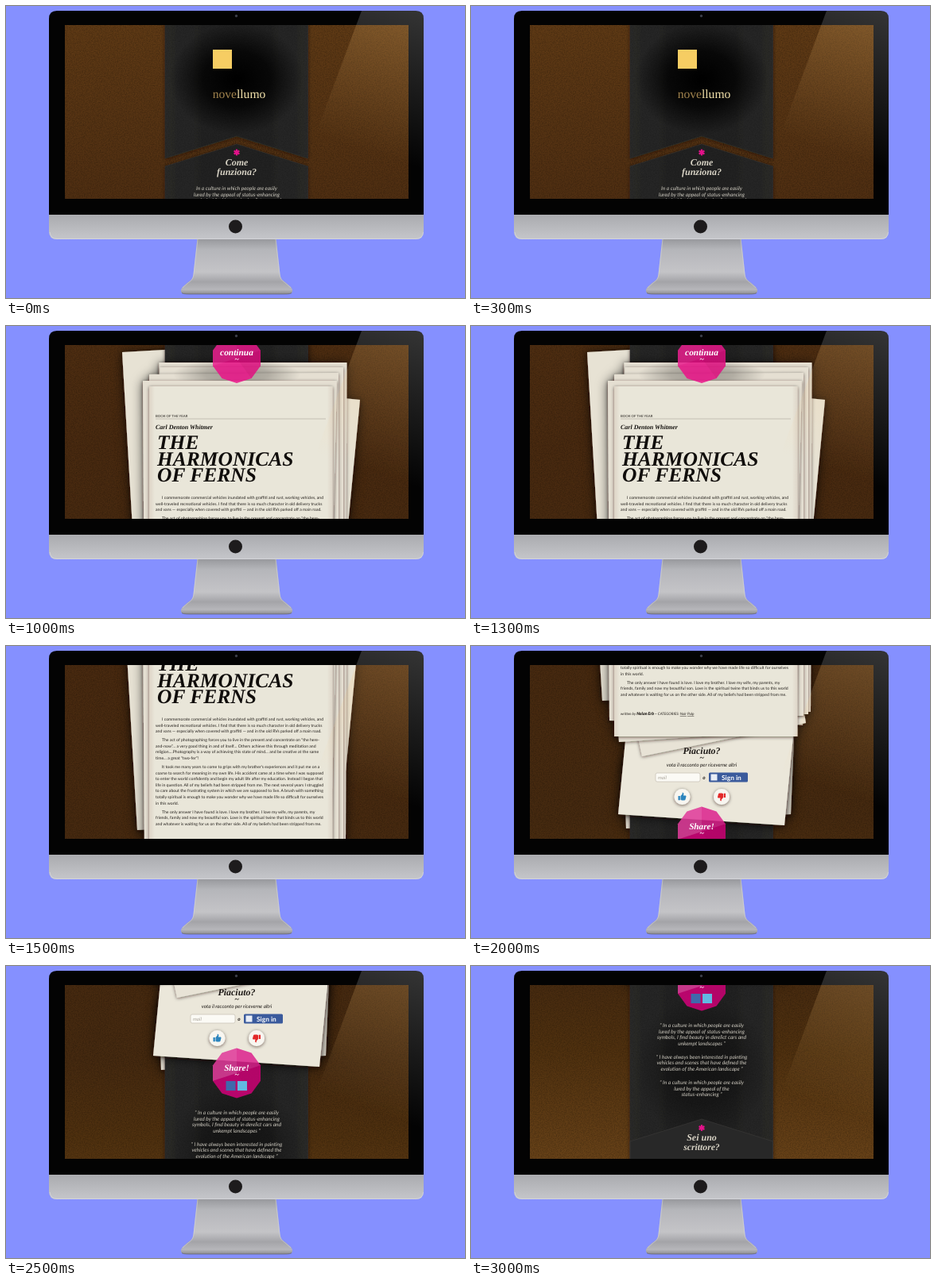
An HTML page for the animation above (3.5 s loop, 577 by 368 pixels).

```html
<!DOCTYPE html>
<html lang="en">
<head>
<meta charset="utf-8">
<title>Story site on a desktop screen</title>
<style>
html, body { margin: 0; width: 100%; height: 100%; overflow: hidden; background: #8590ff; }
svg { display: block; width: 577px; height: 368px; }
text { text-rendering: geometricPrecision; white-space: pre; }
.sans { font-family: Lato, sans-serif; }
.ital { font-family: Lato, sans-serif; font-style: italic; }
.head { font-family: "Liberation Serif", serif; font-style: italic; font-weight: bold; }
.word { font-family: "Liberation Serif", serif; }
</style>
</head>
<body>
<svg viewBox="0 0 577 368" xmlns="http://www.w3.org/2000/svg">
  <defs>
    <clipPath id="screen"><rect x="74" y="24" width="432" height="219"/></clipPath>
    <linearGradient id="leather" gradientUnits="userSpaceOnUse" x1="0" y1="24" x2="0" y2="1000">
      <stop offset="0" stop-color="#5f3a15"/><stop offset=".22" stop-color="#502f12"/>
      <stop offset=".4" stop-color="#492a10"/><stop offset=".76" stop-color="#462a10"/>
      <stop offset=".86" stop-color="#50310f"/><stop offset="1" stop-color="#684218"/>
    </linearGradient>
    <linearGradient id="card" x1="0" x2="1" y1="0" y2="0">
      <stop offset="0" stop-color="#2a2a29"/><stop offset=".3" stop-color="#232323"/>
      <stop offset=".7" stop-color="#232323"/><stop offset="1" stop-color="#2a2a29"/>
    </linearGradient>
    <radialGradient id="dark">
      <stop offset="0" stop-color="#000"/><stop offset=".5" stop-color="#000" stop-opacity=".75"/>
      <stop offset="1" stop-color="#000" stop-opacity="0"/>
    </radialGradient>
    <linearGradient id="sheet" x1="0" x2="1" y1="0" y2="0">
      <stop offset="0" stop-color="#ddd3c5"/><stop offset=".03" stop-color="#e9e6d9"/>
      <stop offset=".97" stop-color="#e9e6d9"/><stop offset="1" stop-color="#ded5c8"/>
    </linearGradient>
    <linearGradient id="chin" x1="0" x2="0" y1="0" y2="1">
      <stop offset="0" stop-color="#a9aaae"/><stop offset=".5" stop-color="#b7b8bc"/>
      <stop offset="1" stop-color="#c5c6ca"/>
    </linearGradient>
    <linearGradient id="neck" gradientUnits="userSpaceOnUse" x1="0" y1="293" x2="0" y2="363">
      <stop offset="0" stop-color="#96979b"/><stop offset=".2" stop-color="#b5b6ba"/>
      <stop offset=".6" stop-color="#c4c4c7"/><stop offset=".78" stop-color="#a4a4a8"/>
      <stop offset=".92" stop-color="#b6b6ba"/><stop offset="1" stop-color="#8d8d91"/>
    </linearGradient>
    <linearGradient id="glare" gradientUnits="userSpaceOnUse" x1="505" y1="6" x2="446" y2="180">
      <stop offset="0" stop-color="#fff" stop-opacity=".19"/><stop offset="1" stop-color="#fff" stop-opacity="0"/>
    </linearGradient>
    <linearGradient id="warm" gradientUnits="userSpaceOnUse" x1="505" y1="6" x2="446" y2="180">
      <stop offset="0" stop-color="#ffc878" stop-opacity=".24"/><stop offset="1" stop-color="#ffc878" stop-opacity="0"/>
    </linearGradient>
    <filter id="grain" x="0" y="0" width="1" height="1">
      <feTurbulence type="fractalNoise" baseFrequency=".7" numOctaves="2" seed="4"/>
      <feColorMatrix values="0 0 0 0 0  0 0 0 0 0  0 0 0 0 0  1.6 0 0 0 -.55"/>
    </filter>
    <filter id="lift" x="-.2" y="-.2" width="1.4" height="1.4">
      <feDropShadow dx="0" dy="1" stdDeviation="2.2" flood-color="#1a0c00" flood-opacity=".6"/>
    </filter>
    <filter id="deep" x="-.2" y="-.2" width="1.4" height="1.4">
      <feDropShadow dx="0" dy="1" stdDeviation="7" flood-color="#000" flood-opacity=".65"/>
    </filter>
  </defs>

  <rect width="577" height="368" fill="#8590ff"/>
  <path d="M240.500 292H339.500L344.500 338Q345 345 351 348L358 354Q361 358 359.500 361Q358 363 350 363H230Q222 363 220.500 361Q219 358 222 354L229 348Q235 345 235.500 338Z" fill="url(#neck)"/>
  <path d="M241 294L236 338Q235.500 345 229.500 348.500L222 355M339 294L344 338Q344.500 345 350.500 348.500L358 355" fill="none" stroke="#dcdcdf" stroke-width=".8" opacity=".6"/>
  <path d="M221 361.500Q222 363 230 363H350Q358 363 359 361.500" fill="none" stroke="#66666c" stroke-width=".8"/>
  <path d="M54 262H525V284Q525 294 515 294H64Q54 294 54 284Z" fill="url(#chin)"/>
  <path d="M55 285Q56 293.500 64 293.500H515Q524 293.500 524.500 285" fill="none" stroke="#e0e0e4" stroke-width=".6"/>
  <path d="M54 263V16Q54 6 64 6H515Q525 6 525 16V263Z" fill="#030303"/>
  <path d="M447 6H515Q525 6 525 16V243H359Z" fill="url(#glare)"/>
  <circle cx="289.500" cy="12.500" r="1.700" fill="#3a3d47"/>
  <circle cx="288.500" cy="278" r="8.500" fill="#1d1b1c"/>
  <g clip-path="url(#screen)">
    <g id="page"></g>
    <path d="M447 6H525V243H359Z" fill="url(#warm)"/>
  </g>
</svg>
<script>
const HOLD = 500;
const STOPS = [0, 140, 261, 385, 548, 647, 757];
const MID = 290;
const page = document.getElementById('page');

const tag = (name, attrs, body = '') =>
  `<${name} ${Object.entries(attrs).map(([k, v]) => `${k}="${v}"`).join(' ')}>${body}</${name}>`;
const rect = (x, y, width, height, fill, more) => tag('rect', { x, y, width, height, fill, ...more });
const poly = (points, fill, more) => tag('polygon', { points, fill, ...more });
const path = (d, more) => tag('path', { d, ...more });
const text = (cls, x, y, size, fill, str, more) =>
  tag('text', { class: cls, x, y, 'font-size': size, fill, ...more }, str);
const mid = (cls, y, size, fill, str, x = MID) => text(cls, x, y, size, fill, str, { 'text-anchor': 'middle' });
const lines = (y, strs) => strs.map((s, i) => mid('ital', y + i * 7.55, 6.6, '#d2cec3', s)).join('');
const sheet = (points, fill = '#e5dfd2') => poly(points, fill, { filter: 'url(#lift)' });
const shade = (cy, rx, ry, opacity) => tag('ellipse', { cx: MID, cy, rx, ry, opacity, fill: 'url(#dark)' });
const grain = (x, width, opacity) => rect(x, 24, width, 976, '#000', { filter: 'url(#grain)', opacity });

function star(y) {
  const arms = [0, 60, 120].map(a => tag('line', {
    x1: MID, x2: MID, y1: y - 3.9, y2: y + 3.9, transform: `rotate(${a} ${MID} ${y})`
  })).join('');
  return tag('g', { stroke: '#e4128b', 'stroke-width': 2.2 }, arms);
}

// Ten-sided translucent badge with a few facets
function badge(cy, fill, shine) {
  const v = Array.from({ length: 10 }, (_, i) => {
    const a = i * Math.PI / 5;
    return `${(MID + 31.5 * Math.sin(a)).toFixed(1)},${(cy - 31.5 * Math.cos(a)).toFixed(1)}`;
  });
  const c = `${MID},${cy}`;
  const pick = (...ids) => ids.map(i => v[i]).join(' ');
  return poly(v.join(' '), fill, { 'fill-opacity': .83 }) +
    poly(pick(7, 8, 9, 0) + ' ' + c, '#fff', { opacity: shine }) +
    poly(pick(0, 1, 2) + ' ' + c, '#fff', { opacity: shine * .55 }) +
    poly(pick(2, 3, 4) + ' ' + c, '#70003c', { opacity: .08 });
}

function leather() {
  return rect(74, 24, 432, 976, 'url(#leather)') + grain(74, 432, .28);
}

// Sheets tucked behind the dark cards
function tucked() {
  return tag('g', { filter: 'url(#deep)' },
    sheet('146,294 376,281 394,604 165,617', '#e7e2d4') +
    sheet('192,690 300,690 300,772 195,778') +
    sheet('300,640 407,640 402,760 300,764'));
}

function cards() {
  const edge = { stroke: '#353433', 'stroke-width': .6, filter: 'url(#lift)' };
  return poly('200,0 379.500,0 379.500,192 290,164 200,192', 'url(#card)', edge) +
    shade(92, 84, 70, 1) +
    poly('200,202 290,174 379.500,202 379.500,1010 200,1010', 'url(#card)', edge) +
    shade(885, 86, 90, .4) +
    grain(200, 179.5, .2) +
    poly('200,978 290,950 379.500,978 379.500,1010 200,1010', '#282828', { stroke: '#3a3937', 'stroke-width': .7 });
}

function intro() {
  const ink = '#d9d4c6';
  const mark = '<tspan fill="#a1834d">nove</tspan><tspan fill="#f3e2ab">llumo</tspan>';
  return rect(260, 55, 24, 24, '#f6cd63') +
    mid('word', 116, 15.6, '#f3e2ab', mark, 293) +
    star(184.5) + mid('head', 201, 12, ink, 'Come') + mid('head', 213, 12, ink, 'funziona?') +
    lines(232.2, [
      'In a culture in which people are easily',
      'lured by the appeal of status-enhancing',
      'symbols, I find beauty in derelict cars and',
      'unkempt landscapes. I have always been',
      'interested in painting...'
    ]);
}

function papers() {
  return tag('g', { filter: 'url(#deep)' },
    sheet('215,332 445,354 417,648 187,626', '#e7e2d4') +
    sheet('200,606 409,620 394,774 185,760', '#ebe7da') +
    sheet('190,570 402,530 421,645 215,687', '#e8e3d6') +
    sheet('178,560 380,560 380,656 186,669') +
    sheet('192.500,307 428.500,307 427,631 190,631') +
    sheet('193.500,313 424,313 424,634 188,634') +
    sheet('180,322 418,320 418,636 180,636') +
    shade(322, 80, 20, .3) +
    sheet('172,330 416,330 408,645 174,642') +
    rect(180, 337, 230.5, 325, 'url(#sheet)', { filter: 'url(#lift)' }));
}

const STORY = [
  ['I commemorate commercial vehicles inundated with graffiti and rust, working vehicles, and',
   'well-traveled recreational vehicles. I find that there is so much character in old delivery trucks',
   'and vans — especially when covered with graffiti — and in the old RVs parked off a main road.'],
  ['The act of photographing forces you to live in the present and concentrate on “the here-',
   'and-now”… a very good thing in and of itself… Others achieve this through meditation and',
   'religion….Photography is a way of achieving this state of mind… and be creative at the same',
   'time… a great “two-fer”!'],
  ['It took me many years to come to grips with my brother’s experiences and it put me on a',
   'coarse to search for meaning in my own life. His accident came at a time when I was supposed',
   'to enter the world confidently and begin my adult life after my education. Instead I began that',
   'life in question. All of my beliefs had been stripped from me. The next several years I struggled',
   'to care about the frustrating system in which we are supposed to live. A brush with something',
   'totally spiritual is enough to make you wonder why we have made life so difficult for ourselves',
   'in this world.'],
  ['The only answer I have found is love. I love my brother. I love my wife, my parents, my',
   'friends, family and now my beautiful son. Love is the spiritual twine that binds us to this world',
   'and whatever is waiting for us on the other side. All of my beliefs had been stripped from me.']
];

function story() {
  const ink = '#25211d';
  let out = text('sans', 188, 376, 4.3, ink, 'BOOK OF THE YEAR') +
    rect(188, 377.7, 214, .6, '#aaa498') +
    text('head', 188, 391, 8, '#14110e', 'Carl Denton Whitmer');
  ['THE', 'HARMONICAS', 'OF FERNS'].forEach((s, i) => {
    out += text('head', 190, 416 + i * 20.7, 25.5, '#100d0b', s);
  });
  let y = 479;
  for (const para of STORY) {
    para.forEach((s, i) => {
      out += text('sans', i ? 188 : 196, y, 5.15, ink, s);
      y += 7.55;
    });
    y += 3.7;
  }
  return out + text('ital', 188, 635, 4.6, ink,
    'written by <tspan font-weight="900" font-size="5.2">Nolan Erb</tspan> ~ CATEGORIES: ' +
    '<tspan text-decoration="underline">Noir</tspan> <tspan text-decoration="underline">Pulp</tspan>');
}

function thumb(x, fill, turn) {
  const hand = path('M-5-1H-2.700V4.300H-5ZM-2-1L.2-3.600V-5.200Q1.900-5.700 1.900-3.400L1.500-1.500H4.200Q5.400-1.200 4.900 0L4 3.500Q3.700 4.500 2.500 4.500H-.5L-2 3.800Z', { fill });
  return tag('circle', { cx: x, cy: 738, r: 10, fill: '#f8f6f0', filter: 'url(#lift)' }) +
    tag('g', { transform: `translate(${x} 738) ${turn}` }, hand);
}

function vote() {
  const ink = '#1c1815';
  return mid('head', 684, 11.9, ink, 'Piaciuto?') + mid('head', 692, 10, ink, '~') +
    mid('ital', 700, 6.4, ink, 'vota il racconto per riceverne altri') +
    rect(232, 708, 56, 11, '#fbfaf5', { rx: 2, stroke: '#cbc5b8', 'stroke-width': .8 }) +
    text('ital', 235, 716, 6.2, '#aaa59b', 'mail') +
    mid('ital', 716, 6.4, ink, '<tspan font-weight="bold">o</tspan>', 293) +
    rect(299, 707.5, 49, 12, '#3a5a9c', { rx: 1.5 }) +
    rect(301.5, 709.5, 8, 8, '#e9eef7') +
    text('sans', 315, 716.5, 8.4, '#fff', 'Sign in', { 'font-weight': 'bold' }) +
    thumb(265.5, '#2b84bd', '') + thumb(315, '#e32929', 'rotate(180)');
}

function share() {
  return badge(782, '#d8007c', .2) +
    mid('head', 779, 11.2, '#fff', 'Share!') + mid('head', 787, 10, '#fff', '~') +
    rect(276.5, 792, 12, 12, '#3f69ab') + rect(291, 792, 12, 12, '#62b9e2');
}

function quotes() {
  const ink = '#d9d4c6';
  return lines(834.2, [
    '“ In a culture in which people are easily',
    'lured by the appeal of status-enhancing',
    'symbols, I find beauty in derelict cars and',
    'unkempt landscapes ”'
  ]) + lines(873.9, [
    '“ I have always been interested in painting',
    'vehicles and scenes that have defined the',
    'evolution of the American landscape ”'
  ]) + lines(906.2, [
    '“ In a culture in which people are easily',
    'lured by the appeal of the',
    'status-enhancing ”'
  ]) + star(961) + mid('head', 976.5, 12, ink, 'Sei uno') + mid('head', 988.5, 11.7, ink, 'scrittore?');
}

function more() {
  return badge(301.5, '#ec0f88', .06) +
    mid('head', 298, 11.4, '#fff', 'continua') + mid('head', 306, 10, '#fff', '~');
}

page.innerHTML = [leather, tucked, cards, intro, papers, story, more, vote, share, quotes].map(f => f()).join('');

let last = -1;
function draw(now) {
  const i = Math.floor(now / HOLD) % STOPS.length;
  if (i !== last) page.setAttribute('transform', `translate(0 ${-STOPS[i]})`);
  last = i;
}
function tick() {
  draw(performance.now());
  requestAnimationFrame(tick);
}
tick();
</script>
</body>
</html>
```
